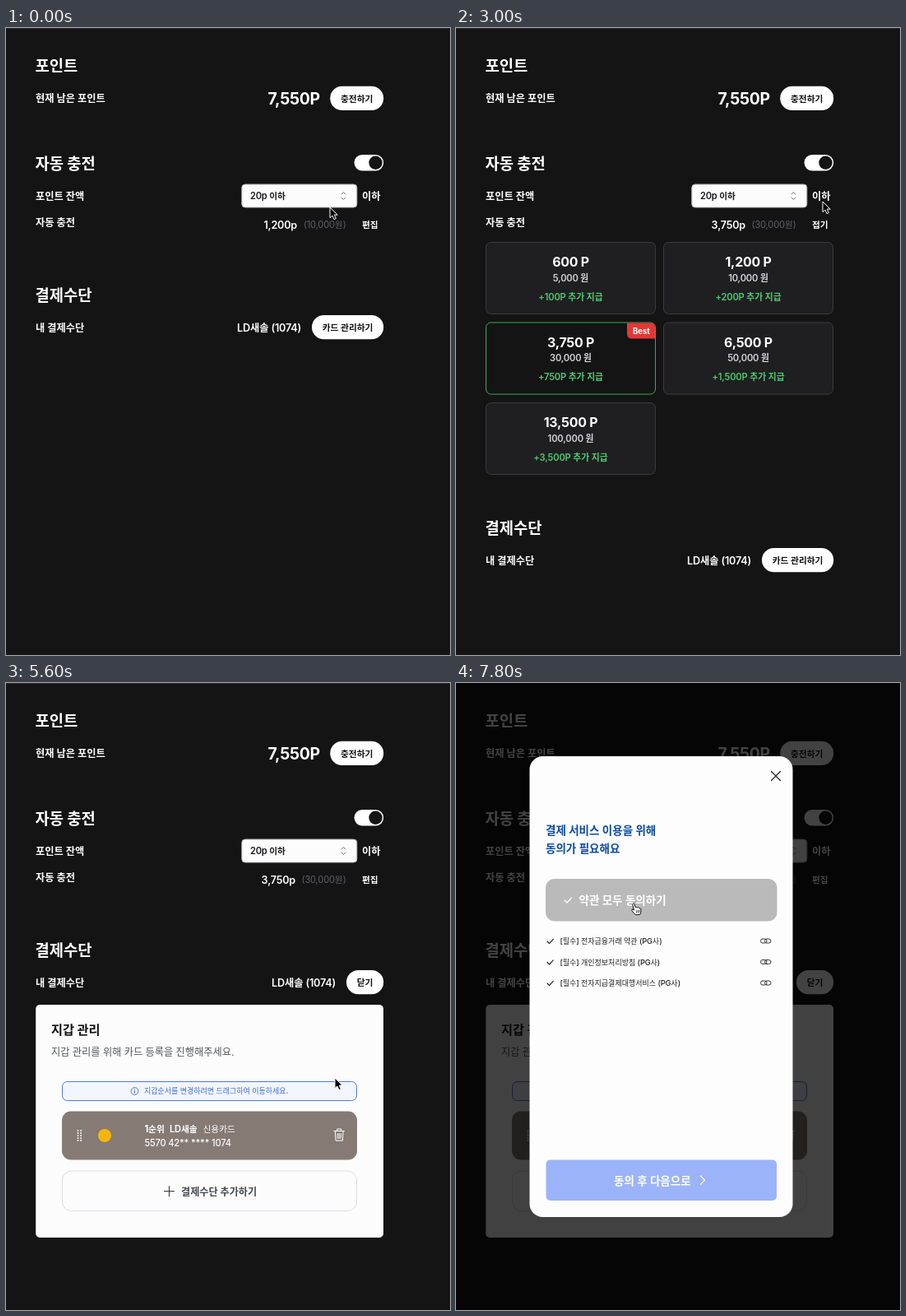
An HTML page that plays this animation: 540 by 762 pixels, repeating every 8000 ms.

```html
<!DOCTYPE html>
<html lang="ko">
<head>
<meta charset="utf-8">
<title>포인트</title>
<style>
html, body { margin: 0; width: 100%; height: 100%; overflow: hidden; background: #141414; }
svg { display: block; width: 100vw; height: 100vh; }
text { font-family: Inter, "Noto Sans CJK KR", "Noto Sans CJK", sans-serif; white-space: pre; }
.ko { font-family: "Noto Sans CJK KR", "Noto Sans CJK", sans-serif; }
.en { letter-spacing: -.015em; }
</style>
</head>
<body>
<svg id="stage" viewBox="0 0 540 762"></svg>
<script>
const LOOP = 8000, STEP = 200;
const EXPAND = 1400, SELECT = 2600, COLLAPSE = 3800, WALLET = 5200, DIM = 6800;
const RISE = 744, SLIDE = 320;
const BANK = 'LD새솔';
const stage = document.getElementById('stage');

// time, x, y, hand?
const path = [
  [0, 394, 218, 0], [200, 370, 207, 0], [400, 240, 215, 0], [600, 77, 262, 0],
  [800, 120, 347, 0], [1000, 300, 290, 0], [1200, 436, 236, 1], [1400, 436, 238, 1],
  [2000, 210, 348, 1], [2200, 150, 385, 1], [2600, 140, 400, 1], [2800, 330, 300, 1],
  [3000, 446, 211, 0], [3200, 491, 300, 0], [3400, 462, 513, 0], [3600, 462, 300, 0],
  [3800, 434, 238, 1], [4200, 438, 240, 1], [4600, 438, 250, 0], [5000, 429, 367, 1],
  [5200, 429, 367, 1], [5600, 400, 480, 0], [6000, 330, 600, 1], [6600, 305, 616, 1],
  [6800, 309, 616, 0], [7000, 309, 616, 0], [7400, 250, 350, 0], [7800, 213, 267, 1]
];

const packs = [
  ['600', '5,000', '100'], ['1,200', '10,000', '200'], ['3,750', '30,000', '750'],
  ['6,500', '50,000', '1,500'], ['13,500', '100,000', '3,500']
].map(([points, won, bonus], i) => ({
  points, won, bonus, x: i % 2 ? 252.5 : 36.5, y: 260.5 + 97.5 * (i >> 1)
}));

const clamp = v => Math.min(1, Math.max(0, v));
const easeOut = v => 1 - (1 - clamp(v)) ** 3;

function pointer(t) {
  const i = path.findLastIndex(k => k[0] <= t);
  const a = path[i], b = path[i + 1] || a;
  const p = b === a ? 0 : (t - a[0]) / (b[0] - a[0]);
  return { x: a[1] + (b[1] - a[1]) * p, y: a[2] + (b[2] - a[2]) * p, hand: a[3] };
}

// y is the middle of the line; Hangul and Latin runs get their own size
function text(x, y, size, str, fill = '#fff', weight = 600, anchor = 'start') {
  const runs = str.split(/([가-힣]+)/).filter(Boolean).map(run => {
    const ko = /[가-힣]/.test(run);
    return `<tspan class="${ko ? 'ko' : 'en'}" font-size="${(size * (ko ? .939 : .97)).toFixed(2)}">${run}</tspan>`;
  }).join('');
  return `<text x="${x}" y="${y + size * .36}" fill="${fill}" font-weight="${weight}" text-anchor="${anchor}">${runs}</text>`;
}
const heading = (y, str) => text(35.5, y, 20, str, '#fff', 700);
const box = (x, y, w, h, r, fill, stroke = 'none') =>
  `<rect x="${x}" y="${y}" width="${w}" height="${h}" rx="${r}" fill="${fill}" stroke="${stroke}"/>`;
const line = (d, stroke, width = 1) =>
  `<path d="${d}" fill="none" stroke="${stroke}" stroke-width="${width}" stroke-linecap="round" stroke-linejoin="round"/>`;
const group = (x, y, body, attrs = '') => `<g transform="translate(${x} ${y})" ${attrs}>${body}</g>`;
const pill = (x, y, w, label) =>
  box(x, y, w, 29.3, 14.65, '#fff') + text(x + w / 2, y + 14.6, 11.4, label, '#111', 600, 'middle');

function header(open, chosen) {
  const price = open.pack.points + 'p';
  return heading(45.4, '포인트')
    + text(36, 85.5, 13, '현재 남은 포인트')
    + text(381.8, 85.5, 20, '7,550P', '#fff', 700, 'end')
    + pill(394.2, 70.8, 65, '충전하기')
    + heading(164.4, '자동 충전')
    + box(423.5, 154, 35.7, 19.5, 9.75, '#fff')
    + '<circle cx="449.5" cy="163.7" r="8.2" fill="#141414"/>'
    + text(36, 204, 13, '포인트 잔액')
    + box(286.8, 190, 140, 28, 4, '#fcfcfc', '#b4b4b8')
    + text(297, 204, 11.4, '20p 이하', '#18181b', 600)
    + line('M408 202l2.4-2.5 2.4 2.5M408 206l2.4 2.5 2.4-2.5', '#777')
    + text(433, 204, 13, '이하')
    + text(36, 236, 13, '자동 충전')
    + text(chosen === 1 ? 354 : 352, 239, 13, price, '#fff', 600, 'end')
    + text(413.5, 239, 11.4, `(${open.pack.won}원)`, '#5f616b', 400, 'end')
    + text(433, 239, 11.4, open.on ? '접기' : '편집');
}

function packCard(pack, i, chosen, cur) {
  const { x, y } = pack, mid = x + 103;
  const dx = cur.x + 3 - x, dy = cur.y - 3 - y;
  const hover = cur.hand && dx > 0 && dx < 206 && dy > 0 && dy < 87;
  const on = i === chosen;
  const badge = i !== 2 ? '' :
    `<path d="M208 ${y + .5}h28.5q5.5 0 5.5 5.5v13.5h-28q-6 0-6-6z" fill="#e63636"/>`
    + text(225.3, y + 10, 10, 'Best', '#fff', 700, 'middle');
  return box(x, y, 206, 87, 6, on ? '#141414' : hover ? '#333' : '#1f1f21', on ? '#3aa757' : '#3c3c3e')
    + badge
    + text(mid, y + 24, 16.4, pack.points + ' P', '#fff', 700, 'middle')
    + text(mid, y + 43.3, 11.5, pack.won + ' 원', '#d4d4d8', 600, 'middle')
    + text(mid, y + 66, 11.5, `+${pack.bonus}P 추가 지급`, '#4ccb70', 600, 'middle');
}

function payment(walletOpen) {
  return heading(324.4, '결제수단')
    + text(36, 364, 13, '내 결제수단')
    + text(walletOpen ? 401 : 359, 364, 13, BANK + ' (1074)', '#fff', 600, 'end')
    + (walletOpen ? pill(414, 349, 45.2, '닫기') : pill(372, 349, 87.2, '카드 관리하기'));
}

function wallet(hover) {
  let grip = '';
  for (let i = 0; i < 10; i++)
    grip += `<circle cx="${87.5 + i % 2 * 3.6}" cy="${544 + (i >> 1) * 3}" r=".95" fill="#fff"/>`;
  return box(36.2, 391, 422.8, 283, 5, '#fcfcfc')
    + text(55, 421.5, 16.2, '지갑 관리', '#111', 700)
    + text(55, 448.5, 13, '지갑 관리를 위해 카드 등록을 진행해주세요.', '#52555e', 400)
    + box(68.5, 484.5, 358, 23, 6, '#f3f5fd', '#4a7be0')
    + '<circle cx="156.5" cy="496" r="4.4" fill="none" stroke="#3b6fd9" stroke-width=".9"/>'
    + line('M156.5 495.6v2.6M156.5 493.8v.1', '#3b6fd9')
    + text(168, 496, 9.6, '지갑순서를 변경하려면 드래그하여 이동하세요.', '#3b6fd9', 500)
    + box(68, 520.5, 359, 59, 11, '#857b74')
    + grip
    + '<circle cx="120" cy="550" r="8" fill="#f7b50c"/>'
    + text(168.5, 542.3, 11.4, '1순위', '#fff', 700)
    + text(199, 542.3, 11.4, BANK)
    + text(239.5, 542.3, 11.4, '신용카드', '#fff', 500)
    + text(168.5, 558.7, 11.4, '5570 42** **** 1074', '#fff', 500)
    + line('M399 544.5h12.4M402.7 544v-2h5v2M400.3 545l.8 11.2h8.2l.8-11.2M403.2 547.5v6M405.2 547.5v6M407.2 547.5v6', '#fff')
    + box(68.5, 593, 358, 48.5, 11, hover ? '#ececee' : '#fcfcfc', hover ? '#c6c8d0' : '#dcdde2')
    + line('M192.5 617.7h12M198.5 611.7v12', '#444952', 1.2)
    + text(213, 618, 12.9, '결제수단 추가하기', '#444952', 600);
}

const tick = (x, y, s, stroke) => line(`M${x} ${y}l${3 * s} ${3 * s} ${5.5 * s} ${-6 * s}`, stroke, 1.2);

function modal(t) {
  const rise = easeOut((t - 6800) / 400);
  if (!rise) return '';
  const slide = easeOut((t - 6854) / 400), fade = clamp((t - 6800) / 350);
  const hover = t >= 7600, agree = hover ? '#fff' : '#222';
  const terms = ['전자금융거래 약관', '개인정보처리방침', '전자지급결제대행서비스'].map((name, i) => {
    const y = 314 + 25.5 * i;
    return tick(111, y, .85, '#222') + text(126.5, y, 9.6, `[필수] ${name} (PG사)`, '#222', 500)
      + box(370.5, y - 3, 7.5, 5, 2.5, 'none', '#333') + box(375.5, y - 3, 7.5, 5, 2.5, 'none', '#333');
  }).join('');
  const content = line('M383.5 107.5l11 11M394.5 107.5l-11 11', '#222', 1.2)
    + text(109, 179, 14.4, '결제 서비스 이용을 위해', '#0c4aa6')
    + text(109, 201.3, 14.4, '동의가 필요해요', '#0c4aa6')
    + box(109, 238, 281.5, 51.5, 11, hover ? '#bababb' : '#ccccce')
    + tick(132, 264, 1, agree)
    + text(149.5, 264, 14.4, '약관 모두 동의하기', agree)
    + terms
    + box(109.5, 579.5, 280.5, 49.5, 5, '#9bb4f9')
    + text(192, 604.5, 14.4, '동의 후 다음으로', '#fff', 600)
    + line('M297.5 599l5 5.2-5 5.2', '#fff', 1.2);
  return group(0, RISE * (1 - rise),
    '<clipPath id="sheet"><rect x="89.5" y="89" width="320" height="560" rx="16"/></clipPath>'
    + box(89.5, 89, 320, 560, 16, '#fdfdfd')
    + `<g clip-path="url(#sheet)">${group(SLIDE * (1 - slide), 0, content, `opacity="${fade}"`)}</g>`,
    `opacity="${rise}"`);
}

function cursor({ x, y, hand }) {
  return group(x, y, hand
    ? '<path d="M3.6 9L1.6 1.8Q2.4.2 3.8 1.4L5.3 5.8Q6.6 4.9 7.5 6 8.8 5.2 9.7 6.5 11.4 6 11.8 7.8L12 11Q11.6 12.8 10.8 14.3L5.5 14.8Q3.4 12.8.9 9.6.5 7.9 2 8Z" fill="#fff" stroke="#111" stroke-width="1" stroke-linejoin="round"/>'
      + line('M6.3 9.3l.3 2.8M8.2 9.2l.2 2.8M10 9l.1 2.8', '#111', .7)
    : '<path d="M0 0V12.6L2.9 10 5 14.6 7.3 13.6 5.3 9.1H9.2Z" fill="#000" stroke="#fff" stroke-width="1" stroke-linejoin="round"/>');
}

function render(t) {
  const cur = pointer(t);
  const on = t >= EXPAND && t < COLLAPSE;
  const chosen = t >= SELECT ? 2 : 1;
  const walletOpen = t >= WALLET;
  const addHover = t >= 6000 && t < 7200;
  const status = t >= 6600 && t < 7200
    ? `<path d="M0 759h141q3 0 3 3H0z" fill="${t < DIM ? '#55535d' : '#dcdbec'}"/>` : '';
  stage.innerHTML = box(0, 0, 540, 762, 0, '#141414')
    + box(0, 0, 540, 1, 0, '#2b293b')
    + header({ on, pack: packs[chosen] }, chosen)
    + (on ? packs.map((p, i) => packCard(p, i, chosen, cur)).join('') : '')
    + group(0, on ? 283 : 0, payment(walletOpen))
    + (walletOpen ? wallet(addHover) : '')
    + (t >= DIM ? '<rect width="540" height="762" opacity=".74"/>' + modal(t) : '')
    + status
    + cursor(cur);
}

let shown = -1;
const start = performance.now();
function frame() {
  const t = Math.floor((performance.now() - start) % LOOP / STEP) * STEP;
  if (t !== shown) render(shown = t);
  requestAnimationFrame(frame);
}
frame();
</script>
</body>
</html>
```
